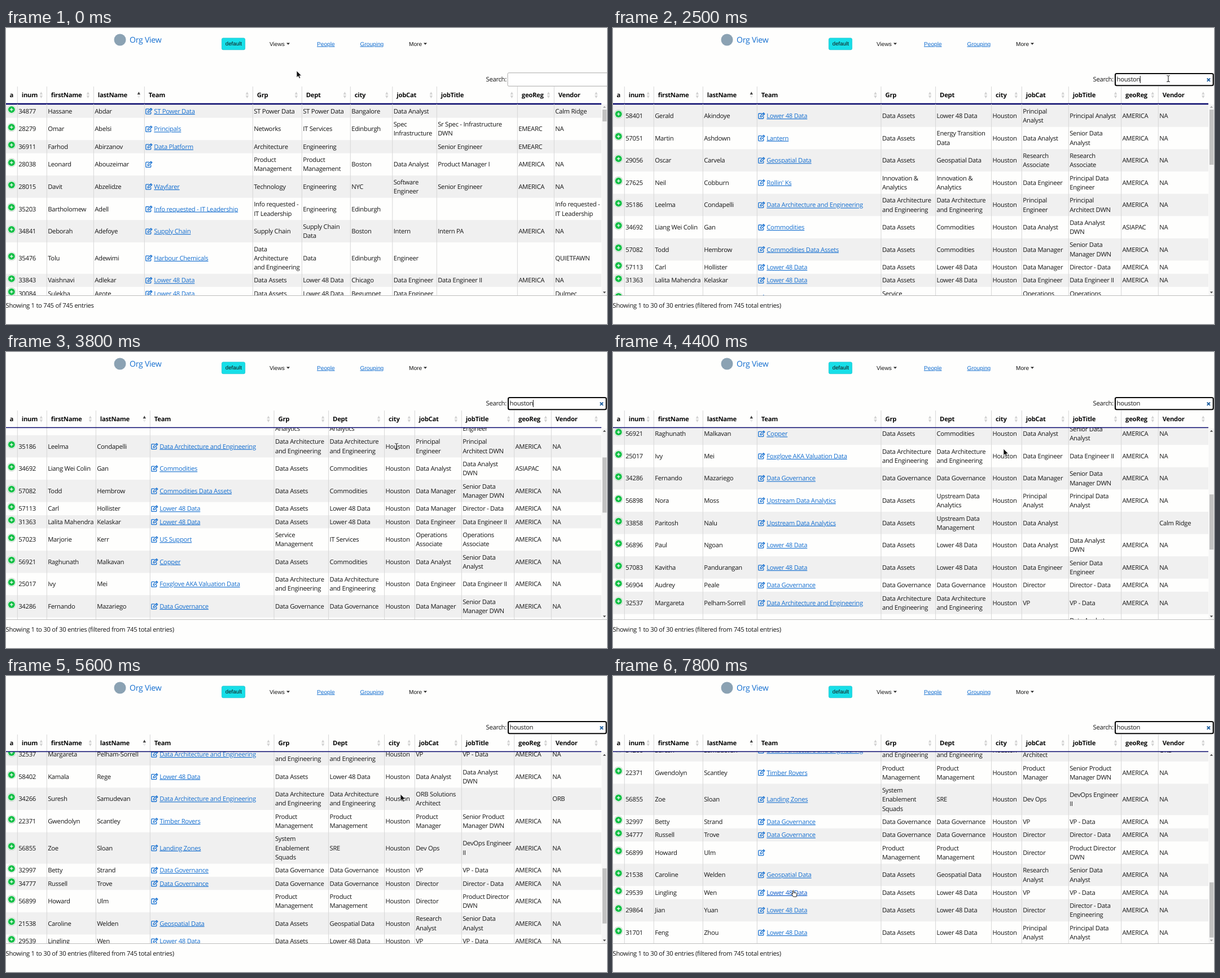
Recreate the animation shown at these times as an HTML page. Size 1065 px wide and 526 px high, loop 8 s.

```html
<!DOCTYPE html>
<html lang="en">
<head>
<meta charset="utf-8">
<title>Org View</title>
<style>
html, body { margin: 0; width: 100%; height: 100%; overflow: hidden; background: #fefefd; }
svg { display: block; width: 100vw; height: 100vh; }
text { font: 11.25px "Open Sans", "Noto Sans", sans-serif; letter-spacing: -.27px; fill: #151515; white-space: pre; text-rendering: geometricPrecision; }
.head { font-weight: 700; fill: #0a0a0a; }
.link { fill: #156fd0; text-decoration: underline 1px; text-underline-offset: 1px; }
.hover { fill: #0a58ca; }
.nav { font: 10.15px "Liberation Sans", Arial, sans-serif; letter-spacing: 0; }
.default { font-size: 9.7px; }
.brand { font-size: 14.1px; fill: #156fd0; }
</style>
</head>
<body>
<svg id="stage" viewBox="0 0 1065 526">
  <defs>
    <clipPath id="view"><rect y="135" width="1056" height="340"/></clipPath>
    <g id="plus">
      <circle r="7.7" fill="#a9c4ae"/><circle r="7.1" fill="#fff"/><circle r="6" fill="#13bf45"/>
      <path d="M-2.8 0H2.8M0 -2.8V2.8" stroke="#fff" stroke-width="1.2"/>
    </g>
    <g id="edit" fill="none" stroke="#156fd0" stroke-width="1.3" stroke-linejoin="round">
      <path d="M6.5 -4H1.5Q.6 -4 .6 -3.1V4.1Q.6 5 1.5 5H8.6Q9.5 5 9.5 4.1V1"/>
      <path d="M4 2.2L4.4 -.2L9.6 -5.2L11.6 -3.3L6.4 1.8ZM8.3 -4L10.3 -2"/>
    </g>
    <path id="up" d="M-2.7 0L0 -5L2.7 0Z"/>
    <path id="down" d="M-2.7 0L0 5L2.7 0Z"/>
  </defs>
</svg>
<script>
const LOOP = 8000, TOP = 136.2, LINE = 16.25, BOTTOM = 475;
const svg = document.getElementById('stage');

function el(tag, attrs = {}, parent = svg, text) {
  const node = document.createElementNS('http://www.w3.org/2000/svg', tag);
  for (const k in attrs) node.setAttribute(k, attrs[k]);
  if (text !== undefined) node.textContent = text;
  parent.appendChild(node);
  return node;
}
const rect = (x, y, width, height, fill, parent, more) =>
  el('rect', { x, y, width, height, fill, ...more }, parent);
const label = (x, y, text, cls = '', parent) => el('text', { x, y, class: cls }, parent, text);
const use = (id, x, y, parent, more) =>
  el('use', { href: '#' + id, transform: `translate(${x} ${y})`, ...more }, parent);
const show = (node, on) => node.setAttribute('display', on ? 'inline' : 'none');

// Columns: inum, first, last, team, grp, dept, city, jobCat, jobTitle, geo, vendor
const everyone = `
34877|Hassane|Abdar|ST Power Data|ST Power Data|ST Power Data|Bangalore|Data Analyst|||Calm Ridge
28279|Omar|Abelsi|Principals|Networks|IT Services|Edinburgh|Spec/Infrastructure|Sr Spec - Infrastructure/DWN|EMEARC|NA
36911|Farhod|Abirzanov|Data Platform|Architecture|Engineering|||Senior Engineer|EMEARC|
28038|Leonard|Abouzeimar||Product/Management|Product/Management|Boston|Data Analyst|Product Manager I|AMERICA|NA
28015|Davit|Abzelidze|Wayfarer|Technology|Engineering|NYC|Software/Engineer|Senior Engineer|AMERICA|NA
35203|Bartholomew|Adell|Info requested - IT Leadership|Info requested -/IT Leadership|Engineering|Edinburgh||||Info requested -/IT Leadership
34841|Deborah|Adefoye|Supply Chain|Supply Chain|Supply Chain/Data|Boston|Intern|Intern PA|AMERICA|NA
35476|Tolu|Adewimi|Harbour Chemicals|Data/Architecture/and Engineering|Data|Edinburgh|Engineer|||QUIETFAWN
33843|Vaishnavi|Adlekar|Lower 48 Data|Data Assets|Lower 48 Data|Chicago|Data Engineer|Data Engineer II|AMERICA|NA
30084|Sulekha|Agote|Lower 48 Data|Data Assets|Lower 48 Data|Begumpet|Data Engineer|||Dulmec`;

// Same columns without city; geo and vendor only where they differ
const houston = `
58401|Gerald|Akindoye|Lower 48 Data|Data Assets|Lower 48 Data|Principal/Analyst|Principal Analyst
57051|Martin|Ashdown|Lantern|Data Assets|Energy Transition/Data|Data Analyst|Senior Data/Analyst
29056|Oscar|Carvela|Geospatial Data|Data Assets|Geospatial Data|Research/Associate|Research/Associate
27625|Neil|Cobburn|Rollin' Ks|Innovation &/Analytics|Innovation &/Analytics|Data Engineer|Principal Data/Engineer
35186|Leelma|Condapelli|Data Architecture and Engineering|Data Architecture/and Engineering|Data Architecture/and Engineering|Principal/Engineer|Principal/Architect DWN
34692|Liang Wei Colin|Gan|Commodities|Data Assets|Commodities|Data Analyst|Data Analyst/DWN|ASIAPAC
57082|Todd|Hembrow|Commodities Data Assets|Data Assets|Commodities|Data Manager|Senior Data/Manager DWN
57113|Carl|Hollister|Lower 48 Data|Data Assets|Lower 48 Data|Data Manager|Director - Data
31363|Lalita Mahendra|Kelaskar|Lower 48 Data|Data Assets|Lower 48 Data|Data Engineer|Data Engineer II
57023|Marjorie|Kerr|US Support|Service/Management|IT Services|Operations/Associate|Operations/Associate
56921|Raghunath|Malkavan|Copper|Data Assets|Commodities|Data Analyst|Senior Data/Analyst
25017|Ivy|Mei|Foxglove AKA Valuation Data|Data Architecture/and Engineering|Data Architecture/and Engineering|Data Engineer|Data Engineer II
34286|Fernando|Mazariego|Data Governance|Data Governance|Data Governance|Data Manager|Senior Data/Manager DWN
56898|Nora|Moss|Upstream Data Analytics|Data Assets|Upstream Data/Analytics|Principal/Analyst|Principal Data/Analyst
33858|Paritosh|Nalu|Upstream Data Analytics|Data Assets|Upstream Data/Management|Data Analyst|||Calm Ridge
56896|Paul|Ngoan|Lower 48 Data|Data Assets|Lower 48 Data|Data Analyst|Data Analyst/DWN
57083|Kavitha|Pandurangan|Lower 48 Data|Data Assets|Lower 48 Data|Data Engineer|Senior Data/Engineer
56904|Audrey|Peale|Data Governance|Data Governance|Data Governance|Director|Director - Data
32537|Margareta|Pelham-Sorrell|Data Architecture and Engineering|Data Architecture/and Engineering|Data Architecture/and Engineering|VP|VP - Data
58402|Kamala|Rege|Lower 48 Data|Data Assets|Lower 48 Data|Data Analyst|Data Analyst/DWN
34266|Suresh|Samudevan|Data Architecture and Engineering|Data Architecture/and Engineering|Data Architecture/and Engineering|ORB Solutions/Architect|||ORB
22371|Gwendolyn|Scantley|Timber Rovers|Product/Management|Product/Management|Product/Manager|Senior Product/Manager DWN
56855|Zoe|Sloan|Landing Zones|System/Enablement/Squads|SRE|Dev Ops|DevOps Engineer/II
32997|Betty|Strand|Data Governance|Data Governance|Data Governance|VP|VP - Data
34777|Russell|Trove|Data Governance|Data Governance|Data Governance|Director|Director - Data
56899|Howard|Ulm||Product/Management|Product/Management|Director|Product Director/DWN
21538|Caroline|Welden|Geospatial Data|Data Assets|Geospatial Data|Research/Analyst|Senior Data/Analyst
29539|Lingling|Wen|Lower 48 Data|Data Assets|Lower 48 Data|VP|VP - Data
29864|Jian|Yuan|Lower 48 Data|Data Assets|Lower 48 Data|Director|Director - Data/Engineering
31701|Feng|Zhou|Lower 48 Data|Data Assets|Lower 48 Data|Principal/Analyst|Principal Data/Analyst`;

const parse = s => s.trim().split('\n').map(r => r.split('|'));
const allRows = parse(everyone);
const houstonRows = parse(houston).map(r => {
  const [geo = 'AMERICA', vendor = 'NA'] = r.slice(8);
  return [...r.slice(0, 6), 'Houston', r[6], r[7], geo, vendor];
});
const titles = ['inum', 'firstName', 'lastName', 'Team', 'Grp', 'Dept', 'city', 'jobCat', 'jobTitle', 'geoReg', 'Vendor'];

function makeTable(rows, edges) {
  const root = el('g');
  const clip = el('g', { 'clip-path': 'url(#view)' }, root);
  const body = el('g', {}, clip);
  const links = [];
  let y = TOP;
  rows.forEach((row, i) => {
    const lines = Math.max(...row.map(c => c.split('/').length));
    const h = 7.1 + LINE * lines, mid = y + h / 2;
    if (i % 2 === 0) rect(0, y, 1055, h, '#f0f0f0', body);
    row.forEach((cell, c) => {
      const team = c === 3, x = edges[c] + (team ? 17.3 : 2.2);
      if (team) use('edit', edges[c] + 2.2, mid, body);
      const parts = cell.split('/');
      parts.forEach((part, k) => {
        const node = label(x, mid + 4 + (k - (parts.length - 1) / 2) * LINE, part, team ? 'link' : '', body);
        if (team) links.push(node);
      });
    });
    use('plus', 9.8, mid - 3, body);
    y += h;
  });
  rect(0, 134.6, 1055, 1.6, '#0b0b6e', body);
  label(6.5, 123, 'a', 'head', root);
  edges.forEach((x, c) => {
    rect(x - .2, 104, 1, BOTTOM - 104, '#d6d6d6', root);
    label(x + 7.8, 123, titles[c], 'head', root);
    const right = (edges[c + 1] ?? 1055.5) - 9.7, sorted = c === 2;
    use('up', right, 118.3, root, { fill: sorted ? '#444' : '#d2d2d2' });
    use('down', right, 120, root, { fill: sorted ? '#e8e8e8' : '#d2d2d2' });
  });
  rect(0, 133.6, 1055, 1.5, '#0b0b6e', root);
  return { root, body, links };
}

// Page header
el('circle', { cx: 202, cy: 21, r: 10.5, fill: '#8ba2b3' });
label(219, 26, 'Org View', 'brand');
rect(382.4, 17.9, 41.2, 20.8, '#17dfe8', svg, { rx: 2.5, stroke: '#1fc3cf', 'stroke-width': .8 });
label(388.8, 31.4, 'default', 'nav default');
label(467, 31.6, 'Views', 'nav');
label(551, 31.6, 'People', 'nav link');
label(627.5, 31.6, 'Grouping', 'nav link');
label(714, 31.6, 'More', 'nav');
for (const x of [500, 743]) el('path', { d: `M${x - 3} 26.5h6l-3 3.2z`, fill: '#222' });

// Search box
label(850.5, 95.2, 'Search:');
const idleBox = rect(889, 79.7, 190, 23.6, '#fff', svg, { rx: 2, stroke: '#aaa' });
const focusBox = el('g');
rect(890, 81, 173.7, 21.2, '#fff', focusBox, { rx: 2.5, stroke: '#080808', 'stroke-width': 2.1 });
el('path', { d: 'M1052.7 89.5l5.4 5.4m0 -5.4l-5.4 5.4', stroke: '#1f5f9f', 'stroke-width': 1.9 }, focusBox);
const query = label(892.5, 95.2, '');
const caret = rect(933, 85, 1, 13, '#111');

// Tables, scrollbar and footer
const full = makeTable(allRows, [20, 72, 155, 245, 437, 524, 610, 684.5, 763, 906, 971]);
const found = makeTable(houstonRows, [20, 72, 159, 255, 474.7, 571.3, 670.3, 724, 807, 900.3, 966]);
const hoverLink = found.links[27];
rect(1055.5, 136, 9.5, 339, '#f5f5f5');
const thumb = rect(1057, 145, 7.3, 21, '#c1c1c1');
const upArrow = el('path', { d: 'M1057.8 141.7h5.4l-2.7 -3z' });
const downArrow = el('path', { d: 'M1057.8 468.5h5.4l-2.7 3z' });
rect(0, BOTTOM, 1065, 1, '#bdbdbd');
const info = label(-.5, 496.6, '');

// Pointers
const pointers = {
  arrow: el('path', { d: 'M0 0V12L2.8 9.5L4.7 13.6L6.7 12.7L4.9 8.8H8.6Z', fill: '#111', stroke: '#fff', 'stroke-width': .7 }),
  beam: el('path', { d: 'M-2.8 -5.5Q0 -5.5 0 -4V4Q0 5.5 -2.8 5.5M2.8 -5.5Q0 -5.5 0 -4M0 4Q0 5.5 2.8 5.5', fill: 'none', stroke: '#222', 'stroke-width': 1.1 }),
  hand: el('path', { d: 'M0 -3.4Q.9 -5 1.8 -3.4V0L6.2 .7Q7.6 1 7.4 2.6L6.6 7.2H1L-2 3Q-2.4 1.6 -1 1.9L0 2.8Z', fill: '#fff', stroke: '#222', 'stroke-width': 1 })
};

const scrollKeys = [
  [3200, 0], [3300, 25], [3400, 80], [3500, 110], [3700, 110], [3800, 146.8], [3900, 200], [4000, 220],
  [4200, 220], [4300, 290], [4400, 374.2], [4500, 420], [4600, 440], [4700, 440], [4800, 480],
  [5000, 573.1], [5200, 602], [5600, 681], [5700, 681], [5800, 700], [6000, 742], [6200, 767.2]
];
const pointerKeys = [
  [600, 515, 76], [700, 690, 84], [800, 842, 83], [900, 842, 83], [1000, 922, 89], [2300, 922, 89],
  [2400, 984, 90], [2600, 984, 90], [2700, 965, 93], [2900, 850, 150], [3100, 722, 174], [3200, 722, 174],
  [3300, 692, 168], [4200, 692, 168], [4300, 692, 172], [4700, 692, 172], [4800, 692, 182], [5000, 692, 182],
  [5600, 699, 210], [5700, 699, 210], [6200, 699, 227], [7200, 699, 227], [7300, 610, 320], [7400, 496, 393],
  [7500, 496, 393], [7700, 345, 386], [7800, 318.5, 385]
];
const typing = [[1300, 'h'], [1600, 'hou'], [1700, 'houst'], [2100, 'houston']];
const caretOn = [[1300, 2800], [3400, 4400], [4900, 5400], [5900, 6400], [7400, 7700]];

function at(keys, t) {
  const i = keys.findIndex(k => k[0] > t);
  if (i < 0) return keys[keys.length - 1].slice(1);
  if (i === 0) return keys[0].slice(1);
  const a = keys[i - 1], b = keys[i], p = (t - a[0]) / (b[0] - a[0]);
  return a.slice(1).map((v, k) => v + (b[k + 1] - v) * p);
}
const within = (t, from, to) => t >= from && t < to;

function pointerKind(t) {
  if (within(t, 1300, 2400)) return '';
  if (t >= 7700) return 'hand';
  if (within(t, 1000, 2700) || within(t, 3300, 4300)) return 'beam';
  return 'arrow';
}

function draw(time) {
  const t = Math.floor(time % LOOP / 100) * 100;
  const focused = t >= 1300, filtered = t >= 2100;
  const [scroll] = at(scrollKeys, t);

  show(full.root, !filtered);
  show(found.root, filtered);
  found.body.setAttribute('transform', `translate(0 ${-scroll})`);
  hoverLink.classList.toggle('hover', t >= 7700);
  thumb.setAttribute('y', 145 + scroll * .289);
  thumb.setAttribute('height', filtered ? 98 : 21);
  upArrow.setAttribute('fill', scroll > 0 ? '#444' : '#a5a5a5');
  downArrow.setAttribute('fill', scroll < 767 ? '#444' : '#a5a5a5');

  show(idleBox, !focused);
  show(focusBox, focused);
  query.textContent = typing.reduce((s, [start, text]) => t >= start ? text : s, '');
  show(caret, caretOn.some(([a, b]) => within(t, a, b)));
  caret.setAttribute('x', 892 + (focused ? query.getComputedTextLength() : 0));

  const count = filtered ? 30 : focused ? 718 : 745;
  info.textContent = `Showing 1 to ${count} of ${count} entries` +
    (focused ? ' (filtered from 745 total entries)' : '');

  const [x, y] = at(pointerKeys, t), kind = pointerKind(t);
  for (const k in pointers) {
    show(pointers[k], k === kind);
    pointers[k].setAttribute('transform', `translate(${x} ${y})`);
  }
}

const start = performance.now();
function tick() {
  draw(performance.now() - start);
  requestAnimationFrame(tick);
}
tick();
</script>
</body>
</html>
```
